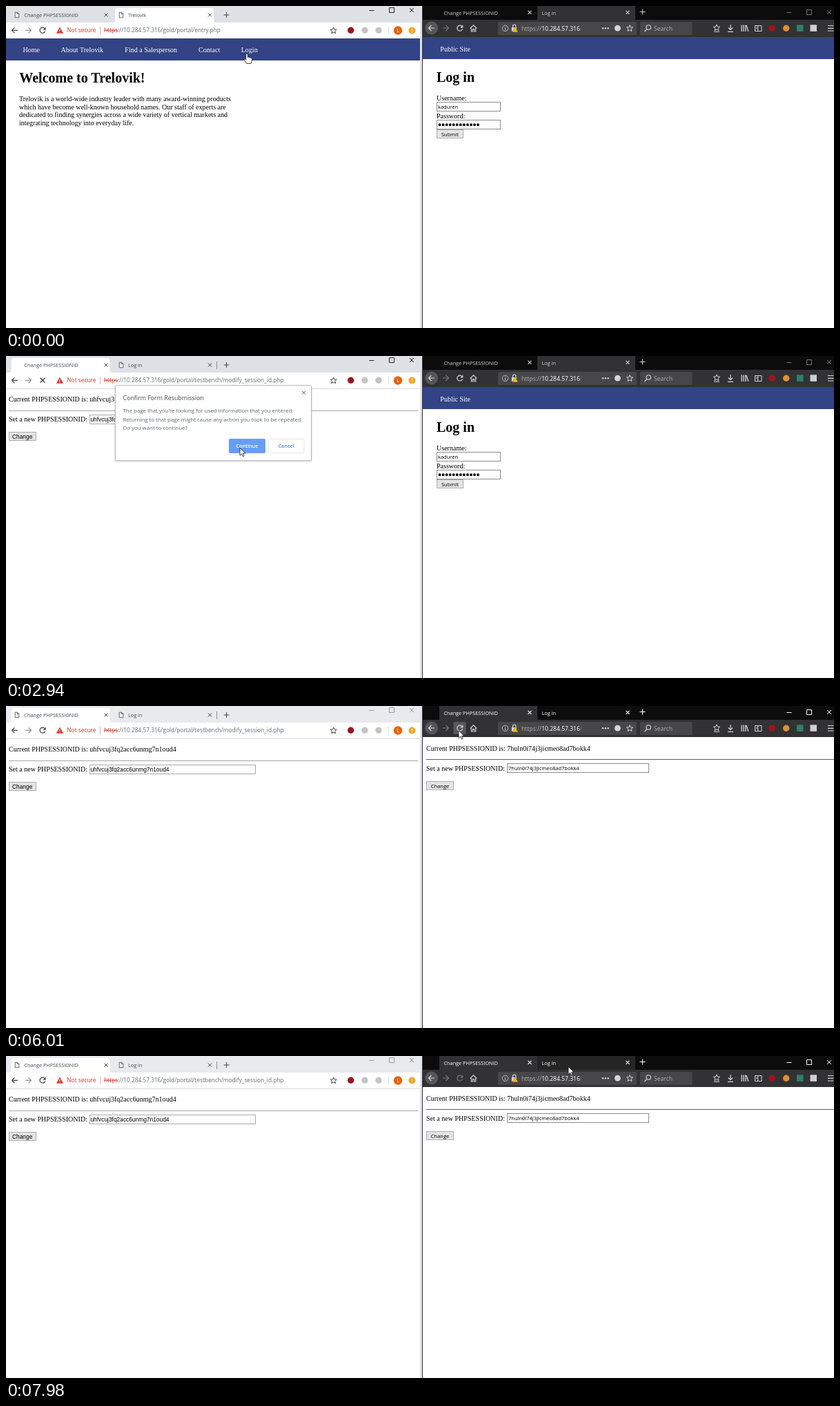
These frames come from a looping animation (1200 px wide and 467 px high, 8 s). An HTML page:

```html
<!DOCTYPE html>
<html lang="en">
<head>
<meta charset="utf-8">
<title>Two browser windows</title>
<style>
html, body { margin: 0; width: 100%; height: 100%; overflow: hidden; background: #fff; }
svg { display: block; width: 100vw; height: 100vh; }

text { font: 7.3px "Open Sans", "Noto Sans", sans-serif; }
.body { font: 10.04px "Liberation Serif", "Times New Roman", serif; }
.head { font: bold 20px "Liberation Serif", "Times New Roman", serif; }
.form { font: 8.4px "Liberation Sans", Arial, sans-serif; }
.form2 { font-size: 7.5px; }
.msg { font: 7.7px "Liberation Sans", Arial, sans-serif; }
.note { font-size: 7.86px; fill: #5f6368; }
.url { font-size: 8.3px; fill: #666a6f; }
.url2 { font-size: 8.55px; fill: #b1b1b3; }
.bold { font-weight: 600; }
.strike { fill: #d93025; text-decoration: line-through; }
.line { fill: none; stroke: currentColor; }
.white { fill: #fff; }
.field { fill: #fff; stroke: #a9a9a9; }
.field2 { fill: #fff; stroke: #8c8c8c; }
.btn { fill: #e4e4e4; stroke: #adadad; }

/* Each state is switched on or off at one moment of the loop. */
.on { animation: 8s step-end infinite; }
@keyframes hello { 0% { visibility: visible } 1.875%, 100% { visibility: hidden } }
@keyframes login { 0% { visibility: hidden } 1.875%, 100% { visibility: visible } }
@keyframes session { 0% { visibility: hidden } 12.25%, 100% { visibility: visible } }
@keyframes icon { 0% { visibility: visible } 31.8% { visibility: hidden } 41.8%, 100% { visibility: visible } }
@keyframes hover { 0% { visibility: hidden } 24.5% { visibility: visible } 30%, 100% { visibility: hidden } }
@keyframes idle { 0% { visibility: visible } 30% { visibility: hidden } 38.5%, 100% { visibility: visible } }
@keyframes ask { 0% { visibility: hidden } 30% { visibility: visible } 38.5%, 100% { visibility: hidden } }
@keyframes swap { 0% { visibility: hidden } 69.6%, 100% { visibility: visible } }
@keyframes hover2 { 0% { visibility: hidden } 75% { visibility: visible } 79.7%, 100% { visibility: hidden } }
@keyframes ask2 { 0% { visibility: hidden } 78.1% { visibility: visible } 86.3%, 100% { visibility: hidden } }
@keyframes tab { 0% { visibility: hidden } 97.8%, 100% { visibility: visible } }
@keyframes fade { 0% { color: #d7d7db } 88%, 100% { color: #77777b } }
@keyframes wake { 0% { color: #77777a } 69.6%, 100% { color: #fff } }
@keyframes glow { 0% { color: #cfcfd2 } 69.6%, 100% { color: #fff } }
@keyframes rest { 0% { color: #222 } 69.6%, 100% { color: #999 } }
@keyframes hand {
  0% { visibility: visible } 1.875% { visibility: hidden }
  57.8% { visibility: visible } 66.2%, 100% { visibility: hidden }
}
@keyframes arrow {
  0% { visibility: hidden } 1.875% { visibility: visible }
  57.8% { visibility: hidden } 66.2%, 100% { visibility: visible }
}
@keyframes move {
  0% { transform: translate(349px, 69px) }
  1.875% { transform: translate(349px, 69px); animation-timing-function: steps(5) }
  10.5% { transform: translate(88px, 13px) }
  15.8% { transform: translate(88px, 13px); animation-timing-function: steps(6) }
  26.4% { transform: translate(52px, 31px) }
  30.1% { transform: translate(52px, 31px); animation-timing-function: steps(4) }
  36.7% { transform: translate(339px, 133px) }
  38.5% { transform: translate(339px, 133px); animation-timing-function: steps(3) }
  43.7% { transform: translate(250px, 112px); animation-timing-function: steps(3) }
  49.1% { transform: translate(60px, 58px); animation-timing-function: steps(5) }
  57.8% { transform: translate(656px, 62px) }
  64.6% { transform: translate(658px, 64px); animation-timing-function: steps(2) }
  67.8% { transform: translate(660px, 12px) }
  69.6% { transform: translate(660px, 12px); animation-timing-function: steps(3) }
  75% { transform: translate(656px, 35.5px) }
  78.1% { transform: translate(656px, 35.5px); animation-timing-function: steps(4) }
  84.8% { transform: translate(992px, 283px) }
  86.3% { transform: translate(992px, 283px); animation-timing-function: steps(3) }
  91% { transform: translate(900px, 112px); animation-timing-function: steps(5) }
  99.7%, 100% { transform: translate(815px, 15.5px) }
}
</style>
</head>
<body>
<svg viewBox="0 0 1200 467" preserveAspectRatio="none">
  <defs>
    <path id="x" class="line" d="M-2.5-2.5 2.5 2.5M2.5-2.5-2.5 2.5"/>
    <path id="plus" class="line" d="M-4 0H4M0-4V4"/>
    <path id="back" class="line" stroke-width="1.2" d="M4.5 0H-4M0-4-4 0 0 4"/>
    <g id="reload">
      <path class="line" stroke-width="1.2" d="M2.9-2.9A4 4 0 1 0 3.9 1"/>
      <path fill="currentColor" d="M4.6-4.8V-.6H.4z"/>
    </g>
    <path id="doc" fill="#fff" stroke="#555" stroke-width=".9" d="M-2.8-3.8H.7L2.8-1.7V3.8H-2.8zM.5-3.8V-1.5H2.8"/>
    <path id="star" class="line" d="M0-4.6 1.3-1.5 4.6-1.3 2.1.9 2.9 4.2 0 2.4-2.9 4.2-2.1.9-4.6-1.3-1.3-1.5z"/>
    <path id="tabshape" fill="#fff" d="M0 24Q4 24 4 20V7Q4 3 8 3H143Q147 3 147 7V20Q147 24 151 24z"/>
    <path id="controls" class="line" d="M-32.5.5H-25.5M-3.5-3.5H3.5V3.5H-3.5zM26-3 32 3M32-3 26 3"/>
  </defs>

  <!-- left window: pages -->
  <rect width="602" height="467" fill="#fff"/>
  <rect y="47" width="602" height="32" fill="#324386"/>
  <g class="on" style="animation-name:hello">
    <g class="white">
      <text class="body" x="24.5" y="66.7">Home</text>
      <text class="body" x="79.5" y="66.7">About Trelovik</text>
      <text class="body" x="172.3" y="66.7">Find a Salesperson</text>
      <text class="body" x="279" y="66.7">Contact</text>
      <text class="body" x="340.7" y="66.7">Login</text>
    </g>
    <text class="head" x="19.3" y="110.6">Welcome to Trelovik!</text>
    <text class="body" x="19" y="138.3">Trelovik is a world-wide industry leader with many award-winning products</text>
    <text class="body" x="19" y="149.7">which have become well-known household names. Our staff of experts are</text>
    <text class="body" x="19" y="161.2">dedicated to finding synergies across a wide variety of vertical markets and</text>
    <text class="body" x="19" y="172.6">integrating technology into everyday life.</text>
  </g>
  <g class="on" style="animation-name:login">
    <text class="body white" x="24.5" y="66.7">Public Site</text>
    <text class="head" x="19.3" y="110.6">Log in</text>
    <text class="body" x="19" y="138">Username:</text>
    <rect class="field" x="19.5" y="140.5" width="92" height="13"/>
    <text class="body" x="19" y="163.5">Password:</text>
    <rect class="field" x="19.5" y="166.5" width="92" height="13"/>
    <rect class="btn" x="19.5" y="180.5" width="37" height="11"/>
    <text class="form" x="25.5" y="189">Submit</text>
  </g>
  <g class="on" style="animation-name:session">
    <rect y="47" width="602" height="150" fill="#fff"/>
    <path stroke="#d9d9d9" d="M0 47.5H602"/>
    <text class="body" x="4" y="66.3">Current PHPSESSIONID is: uhfvcuj3fq2acc6unmg7n1oud4</text>
    <path stroke="#aaa4a4" d="M4 79.5H597.5"/>
    <text class="body" x="4" y="94.8">Set a new PHPSESSIONID:</text>
    <rect class="field" x="121.5" y="85.5" width="240" height="13"/>
    <text class="form" x="122.4" y="95">uhfvcuj3fq2acc6unmg7n1oud4</text>
    <rect class="btn" x="4.5" y="110.5" width="39" height="12"/>
    <text class="form" x="9" y="119.7">Change</text>
  </g>

  <!-- left window: tabs and toolbar -->
  <rect width="602" height="24" fill="#dee1e6"/>
  <use href="#tabshape" x="154"/>
  <g class="on" style="animation-name:session">
    <rect width="602" height="24" fill="#dee1e6"/>
    <rect class="on" style="animation-name:swap" width="602" height="24" fill="#e8eaee"/>
    <use href="#tabshape" x="3.5"/>
    <path stroke="#8d9095" d="M305.5 8V19"/>
  </g>
  <rect y="24" width="602" height="23" fill="#fff"/>
  <use class="on" style="animation-name:icon" href="#doc" x="16" y="13"/>
  <use href="#doc" x="167" y="13"/>
  <g fill="#45494d">
    <text x="26.3" y="15.9">Change PHPSESSIONID</text>
    <text class="on" style="animation-name:hello" x="177" y="15.9">Trelovik</text>
    <text class="on" style="animation-name:login" x="177" y="15.9">Log in</text>
  </g>
  <g color="#444">
    <use href="#x" x="145" y="13"/>
    <use href="#x" x="295.5" y="13"/>
    <use href="#plus" x="319.5" y="13"/>
    <use href="#back" x="12.5" y="35.3"/>
    <use href="#back" transform="translate(32.5 35.3) scale(-1 1)" color="#929292"/>
    <circle class="on" style="animation-name:hover" cx="53" cy="35.5" r="8.5" fill="#e3e4e6"/>
    <use class="on" style="animation-name:idle" href="#reload" x="53" y="35.3"/>
    <use class="on" style="animation-name:ask" href="#x" transform="translate(53 35.3) scale(1.4)"/>
    <use href="#star" x="474.7" y="35.5"/>
  </g>
  <use class="on" style="animation-name:rest" href="#controls" x="559" y="6"/>
  <path fill="#d93025" d="M78 30.5 83 39.8H73z"/>
  <path stroke="#fff" d="M78 33.6V36.8M78 37.7V38.8"/>
  <text x="88.3" y="38.4" style="font-size:8.4px" fill="#d93025">Not secure</text>
  <path stroke="#d8b0ac" d="M136.5 30V41"/>
  <text class="url on" style="animation-name:hello" x="142" y="38.4"><tspan class="strike">https</tspan>://10.284.57.316/gold/portal/entry.php</text>
  <g class="on" style="animation-name:login">
    <text class="url" x="142" y="38.4"><tspan class="strike">https</tspan>://10.284.57.316/gold/portal/crew/login.php</text>
  </g>
  <g class="on" style="animation-name:session">
    <rect x="140" y="27" width="322" height="18" fill="#fff"/>
    <text class="url" x="142" y="38.4"><tspan class="strike">https</tspan>://10.284.57.316/gold/portal/testbench/modify_session_id.php</text>
  </g>
  <circle cx="499.7" cy="35.3" r="4.7" fill="#9b1420"/>
  <circle cx="520" cy="35.3" r="4.7" fill="#c4c4c4"/>
  <circle cx="540" cy="35.3" r="4.7" fill="#c4c4c4"/>
  <path stroke="#ddd" d="M554.5 30V41"/>
  <circle cx="568" cy="35.5" r="6.2" fill="#e8630a"/>
  <text class="white" x="566.2" y="38.2">L</text>
  <circle cx="588.5" cy="35.5" r="5" fill="#f2a51f"/>
  <path stroke="#fff" d="M588.5 32.5V36.3M588.5 37.4V38.5"/>

  <!-- left window: question -->
  <g class="on" style="animation-name:ask">
    <rect x="157" y="43" width="287" height="111" rx="2" fill="#000" opacity=".1"/>
    <rect x="158.5" y="42.5" width="284" height="109" rx="1" fill="#fff" stroke="#bbb"/>
    <use href="#x" x="431.5" y="53.2" color="#555"/>
    <text x="169.5" y="63.8" style="font-size:8.85px" fill="#454545">Confirm Form Resubmission</text>
    <text class="note" x="169.5" y="81.8">The page that you're looking for used information that you entered.</text>
    <text class="note" x="169.5" y="94.5">Returning to that page might cause any action you took to be repeated.</text>
    <text class="note" x="169.5" y="107.2">Do you want to continue?</text>
    <rect x="323" y="120" width="53" height="21" rx="2" fill="#689df6"/>
    <text class="bold white" x="333.3" y="133.2">Continue</text>
    <rect x="380.5" y="120.5" width="51.5" height="20" rx="2" fill="#fff" stroke="#e4e6e8"/>
    <text class="bold" x="394.5" y="133.2" fill="#4c8bf5">Cancel</text>
  </g>

  <!-- right window: pages -->
  <rect x="604" width="596" height="467" fill="#fff"/>
  <rect x="604" y="45" width="596" height="32" fill="#324386"/>
  <text class="body white" x="629.3" y="65.7">Public Site</text>
  <text class="head" x="624" y="109.6">Log in</text>
  <text class="body" x="624" y="137.2">Username:</text>
  <rect class="field2" x="624.5" y="139.5" width="92" height="13"/>
  <text class="form2" x="626" y="149.2">kaduren</text>
  <text class="body" x="624" y="162.7">Password:</text>
  <rect class="field2" x="624.5" y="165.5" width="92" height="13"/>
  <path d="M628.5 172.3H685" fill="none" stroke="#000" stroke-width="4" stroke-linecap="round" stroke-dasharray="0 5.05"/>
  <rect class="btn" x="624.5" y="179.5" width="38" height="12"/>
  <text class="form2" x="631" y="188.5">Submit</text>
  <g class="on" style="animation-name:swap">
    <rect x="604" y="45" width="596" height="155" fill="#fff"/>
    <text class="body" x="609" y="65.3">Current PHPSESSIONID is: 7huln0i74j3jicmeo8ad7bokk4</text>
    <path stroke="#606060" d="M609 77.5H1200"/>
    <text class="body" x="609" y="93.8">Set a new PHPSESSIONID:</text>
    <rect class="field2" x="726.5" y="83.5" width="205" height="13"/>
    <text class="form2" x="728" y="93">7huln0i74j3jicmeo8ad7bokk4</text>
    <rect class="btn" x="609.5" y="109.5" width="39" height="12"/>
    <text class="form2" x="615.8" y="118.6">Change</text>
  </g>

  <!-- right window: tabs and toolbar -->
  <rect x="604" width="596" height="20" fill="#0c0c0d"/>
  <rect x="770" width="142" height="20" fill="#323234"/>
  <g class="on" style="animation-name:swap">
    <rect x="770" width="142" height="20" fill="#0c0c0d"/>
    <rect x="628" width="142" height="20" fill="#323234"/>
  </g>
  <rect class="on" style="animation-name:tab" x="770" width="142" height="20" fill="#252526"/>
  <rect x="604" y="20" width="596" height="25" fill="#323234"/>
  <g class="on" style="animation-name:glow" fill="currentColor">
    <text x="634.5" y="12.6">Change PHPSESSIONID</text>
    <text x="776.5" y="12.6">Log in</text>
    <g stroke-width="1.2">
      <use href="#x" x="759" y="9.3"/>
      <use href="#x" x="901" y="9.3"/>
    </g>
    <use href="#plus" x="922.5" y="8.5"/>
  </g>
  <g color="#d7d7db">
    <circle cx="616.7" cy="32" r="9" fill="#565658" stroke="#6a6a6c" stroke-width=".6"/>
    <use href="#back" x="616.5" y="32"/>
    <use href="#back" transform="translate(637.5 32) scale(-1 1)" color="#77777b"/>
    <rect class="on" style="animation-name:hover2" x="648.5" y="23" width="18" height="18" rx="1.5" fill="#59595b"/>
    <use class="on" style="animation-name:fade" href="#reload" x="657.8" y="32.2"/>
    <path class="line" stroke-width="1.1" d="M672.8 32.5 677.5 27.8 682.2 32.5M674.3 32V37H676.4V33.6H678.6V37H680.7V32"/>
    <rect x="713" y="23" width="201" height="19" rx="1.5" fill="#474749"/>
    <rect x="919" y="23" width="75.5" height="19" rx="1.5" fill="#474749"/>
    <circle class="line" cx="723.5" cy="32.3" r="4.2" stroke-width=".8"/>
    <path class="line" d="M723.5 30V31M723.5 32V34.8"/>
    <path class="line" stroke-width="1.2" d="M734.5 31V29.2A2.2 2.2 0 0 1 738.9 29.2V31"/>
    <path fill="#d7d7db" d="M732.8 31H740V36.8H732.8z"/>
    <path fill="#ffbf00" stroke="#474749" stroke-width=".4" d="M738 30.8 742.2 37.8H733.8z"/>
    <g fill="#d7d7db">
      <text class="url2" x="747" y="36">https<tspan>://</tspan><tspan class="white">10.284.57.316</tspan><tspan fill="#6d6d70">/</tspan></text>
      <text class="url2" x="939" y="36">Search</text>
      <circle cx="865" cy="32.3" r="1.2"/>
      <circle cx="868.8" cy="32.3" r="1.2"/>
      <circle cx="872.6" cy="32.3" r="1.2"/>
      <circle cx="886.4" cy="32.2" r="4.4"/>
    </g>
    <use href="#star" x="904" y="32.3"/>
    <path class="line" stroke-width="1.2" d="M928.8 33.6 925.5 37"/>
    <circle class="line" cx="931.2" cy="31" r="3.3" stroke-width="1.1"/>
    <use href="#star" x="1030" y="31.5"/>
    <path class="line" d="M1026 37.3H1034"/>
    <path class="line" stroke-width="1.2" d="M1050 27V34.5M1046.8 31.5 1050 34.7 1053.2 31.5M1046 37.3H1054"/>
    <path class="line" stroke-width="1.3" d="M1066.2 27.5V37M1069 27.5V37M1071.8 27.5V37M1073 28 1075.8 37"/>
    <path class="line" d="M1085.5 28.5H1095V36.5H1085.5zM1089.8 28.5V36.5M1087 31H1088.6M1087 33H1088.6"/>
    <path class="line" stroke-width="1.2" d="M1191 28.5H1199.5M1191 32.3H1199.5M1191 36H1199.5"/>
  </g>
  <circle cx="1110.3" cy="32.3" r="4.7" fill="#a3121d"/>
  <circle cx="1130.7" cy="32.3" r="4.7" fill="#d9913a"/>
  <rect x="1146" y="27.3" width="9.5" height="9.5" fill="#2f8064"/>
  <rect x="1165.5" y="27.3" width="9.5" height="9.5" fill="#d0d0d0"/>
  <use class="on" style="animation-name:wake" href="#controls" x="1164" y="9"/>

  <!-- right window: question -->
  <g class="on" style="animation-name:ask2">
    <rect x="604" y="45" width="596" height="422" opacity=".45"/>
    <rect x="724.5" y="210" width="362" height="89.5" fill="#fafafa" stroke="#777" stroke-width=".6"/>
    <text class="msg" x="737.5" y="235.3">To display this page, Tirolva must send information that will repeat any action (such as a search or</text>
    <text class="msg" x="737.5" y="245">order confirmation) that was performed earlier.</text>
    <path stroke="#e1e1e1" d="M725 264.5H1086"/>
    <rect x="970" y="274" width="45.5" height="14.5" fill="#e5f1fb" stroke="#0078d7"/>
    <text class="msg" x="978.7" y="283.6">Resend</text>
    <rect x="1023.5" y="274" width="46.5" height="14.5" fill="#e1e1e1" stroke="#adadad"/>
    <text class="msg" x="1034.2" y="283.6">Cancel</text>
  </g>

  <!-- border between the windows -->
  <rect x="600" width="3" height="467" fill="#e2e2ea"/>
  <rect x="603" width="1" height="467" fill="#35303f"/>

  <g class="on" style="animation-name:move" fill="#fff" stroke="#111" stroke-width=".8" stroke-linejoin="round">
    <path class="on" style="animation-name:arrow" d="M0 0V11.2L2.6 8.8 4.3 12.7 6.2 11.9 4.5 8.1H8z"/>
    <path class="on" style="animation-name:hand" d="M-1.3 9V1Q-1.3 0 0 0T1.3 1V5.2Q3.2 4.4 3.6 5.7 5.3 5 5.7 6.4 7.4 6 7.4 7.6V10.5Q7.2 12.6 6 14.5H-.4Q-1.5 12.4-3.8 9.2-4.4 7.6-3 7.4-2 7.6-1.3 9z"/>
  </g>
</svg>
</body>
</html>
```
